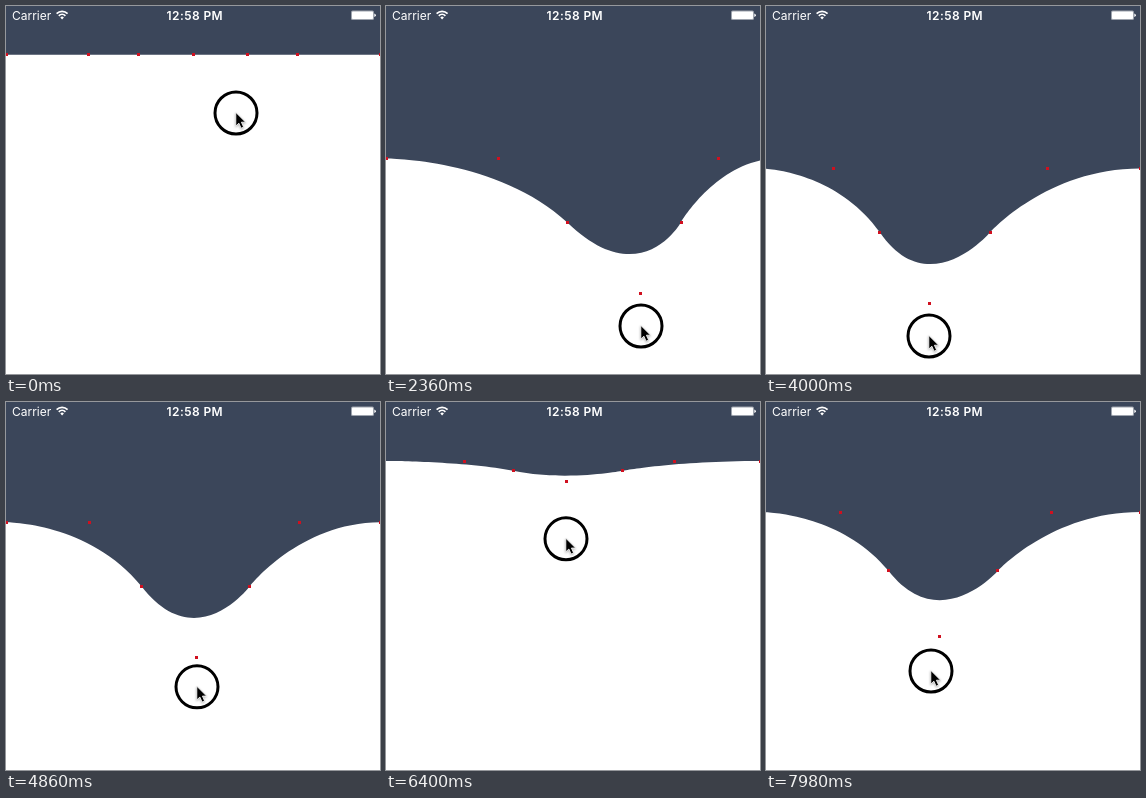
Write an HTML page that moves like this. It is 374 px wide and 368 px high and loops after 8000 ms.

```html
<!DOCTYPE html>
<html lang="en">
<head>
<meta charset="utf-8">
<title>Elastic header</title>
<style>
  html, body { margin: 0; width: 100%; height: 100%; overflow: hidden; background: #fff; }
  svg { display: block; width: 374px; height: 368px; }
  text { font: 400 12px Inter, "Open Sans", sans-serif; fill: #fff; }
  .time { font-weight: 600; letter-spacing: .4px; }
  #wave { fill: #3b465a; }
  #dots rect { fill: #d0101f; }
  .arrow { filter: drop-shadow(0 1px 1px rgba(0, 0, 0, .3)); }
</style>
</head>
<body>
<svg viewBox="0 0 374 368">
  <path id="wave"/>
  <g id="dots"></g>
  <text x="6" y="13.7">Carrier</text>
  <g fill="none" stroke="#fff" stroke-width="1.7">
    <path d="M50.6 7.6a7.8 7.8 0 0 1 11 0M52.8 9.8a4.7 4.7 0 0 1 6.6 0"/>
    <path d="M56.1 13.4l-1.8-1.9a2.5 2.5 0 0 1 3.6 0z" fill="#fff" stroke="none"/>
  </g>
  <text class="time" x="188.8" y="13.7" text-anchor="middle">12:58 PM</text>
  <g fill="#fff">
    <rect x="345" y="4.6" width="23" height="9.4" rx="1.6" opacity=".5"/>
    <rect x="346" y="5.6" width="21" height="7.4" rx=".8"/>
    <path d="M368.3 7.6q1.6 .4 1.6 1.7t-1.6 1.7z"/>
  </g>
  <g id="pointer">
    <circle r="21" fill="none" stroke="#000" stroke-width="3"/>
    <path class="arrow" d="M-.2-.6V13L2.9 10.2 5.1 15.2 7.6 14.1 5.4 9.2H9.6Z" stroke="#fff" stroke-width=".8"/>
  </g>
</svg>
<script>
const W = 374, LOOP = 8000, LAG = 22;
const REST = 48.8, MAX_WAVE = 99.7, GRAB_Y = 116.7, GRAB_TIME = 180;

// Turning points of the drag: time, x, y, pause
const stops = [
  [0, 230, 107, 100], [900, 190, 247], [1040, 153, 262], [1260, 104, 292],
  [1720, 132, 296], [2340, 255, 320, 280], [3080, 318, 348], [3700, 163, 330, 300],
  [4350, 80, 341], [4860, 191, 285], [5630, 182, 151], [5880, 180, 200, 340],
  [6400, 180, 137], [6610, 179, 112, 150], [7560, 206, 260], [7760, 228, 274],
  [7980, 165, 269]
];
const keys = stops.flatMap(([t, x, y, pause]) =>
  pause ? [[t, x, y], [t + pause, x, y]] : [[t, x, y]]);

const slope = (i, k) => (keys[i + 1][k] - keys[i][k]) / (keys[i + 1][0] - keys[i][0]);

// Monotone tangent, so the path never overshoots a key
function tangent(i, k) {
  if (i === 0) return 0;
  const a = slope(i - 1, k);
  if (i === keys.length - 1) return a * 1.5;
  const b = slope(i, k);
  return a * b > 0 ? 2 * a * b / (a + b) : 0;
}

function pointerAt(t) {
  t = Math.max(t, 0);
  let i = 0;
  while (i < keys.length - 2 && t >= keys[i + 1][0]) i++;
  const h = keys[i + 1][0] - keys[i][0], u = Math.min((t - keys[i][0]) / h, 1);
  return [1, 2].map(k => {
    const p = keys[i][k], q = keys[i + 1][k];
    return p + (q - p) * u * u * (3 - 2 * u)
      + h * u * (1 - u) * (tangent(i, k) * (1 - u) - tangent(i + 1, k) * u);
  });
}

function controlPoints(x, pull) {
  const wave = Math.min(pull * 0.6, MAX_WAVE);
  const base = REST + pull - wave;
  const shift = (x - W / 2) * 0.28;
  const left = Math.min(shift, 0), right = Math.max(W + shift, W);
  const lw = x - left, rw = right - x, side = base + wave * 0.64;
  return [
    [left, base], [left + lw * 0.44, base], [left + lw * 0.71, side],
    [x, base + wave * 1.36],
    [right - rw * 0.71, side], [right - rw * 0.44, base], [right, base]
  ];
}

const byId = id => document.getElementById(id);
const wavePath = byId("wave"), pointer = byId("pointer");
const dots = Array.from({ length: 7 }, () => {
  const r = document.createElementNS("http://www.w3.org/2000/svg", "rect");
  r.setAttribute("width", 3);
  r.setAttribute("height", 3);
  return byId("dots").appendChild(r);
});

function draw(t) {
  const [px, py] = pointerAt(t);
  pointer.setAttribute("transform", `translate(${px} ${py})`);

  const [x, y] = pointerAt(t - LAG);
  const pts = controlPoints(t < GRAB_TIME ? W / 2 : x, Math.max(y - GRAB_Y, 0));
  const [l3, l2, l1, c, r1, r2, r3] = pts;
  wavePath.setAttribute("d",
    `M0 0V${l3[1]}H${l3[0]}C${[l3, l2, l1]}C${[c, r1, r1]}C${[r1, r2, r3]}H${W}V0Z`);
  pts.forEach(([dx, dy], i) => {
    dots[i].setAttribute("x", Math.round(dx - 1.5));
    dots[i].setAttribute("y", Math.round(dy - 1.5));
  });
}

const start = performance.now();
function tick() {
  draw((performance.now() - start) % LOOP);
  requestAnimationFrame(tick);
}
tick();
</script>
</body>
</html>
```
